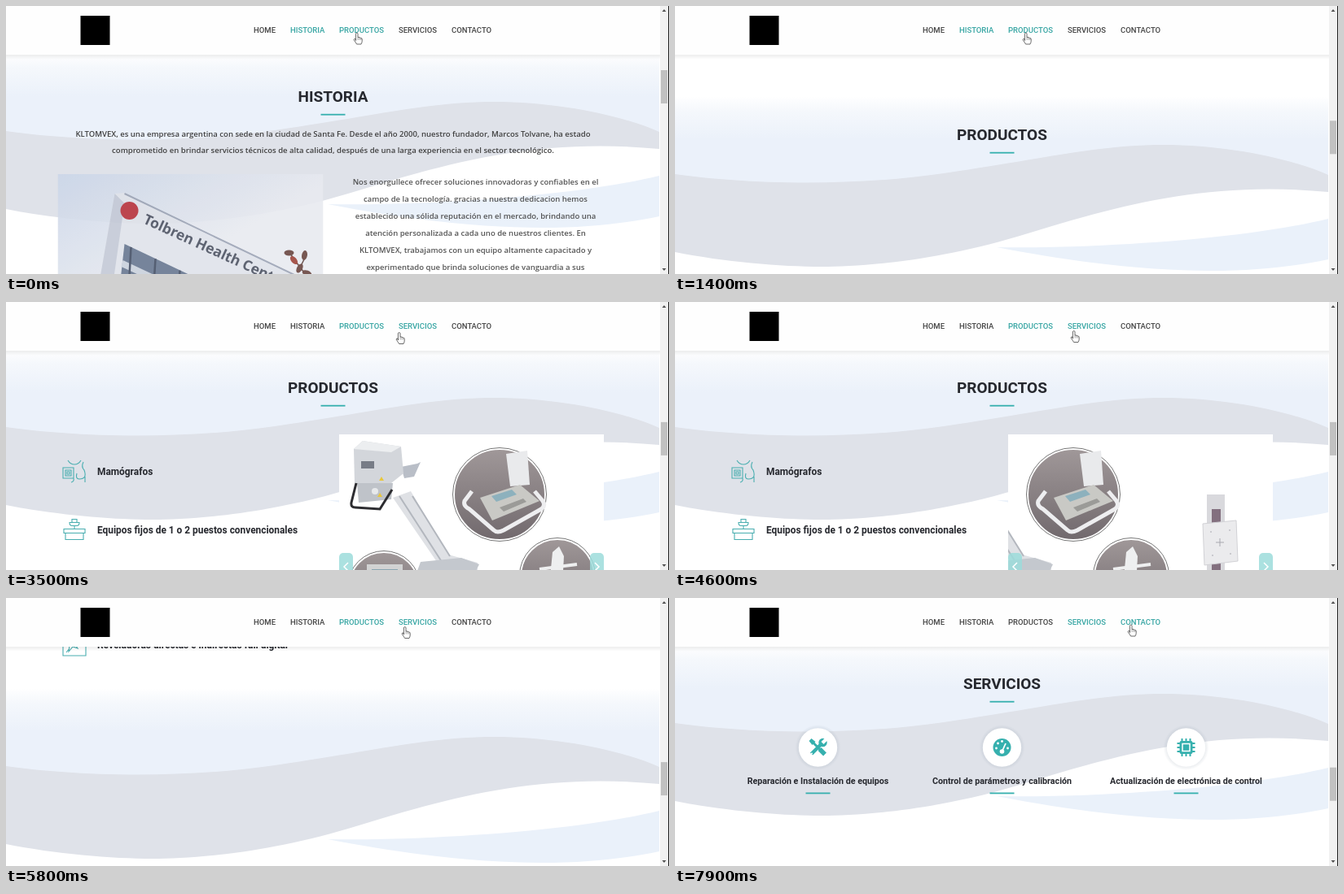
An HTML page for the animation above (8000 ms loop, 814 by 330 pixels).

```html
<!DOCTYPE html>
<html lang="es">
<head>
<meta charset="utf-8">
<title>Historia, productos y servicios</title>
<style>
html, body { margin: 0; width: 100%; height: 100%; overflow: hidden; background: #fff; }
svg { display: block; width: 100vw; height: 100vh; }
text { font-family: Roboto, sans-serif; fill: #26282e; }
.nav { font-size: 9.5px; font-weight: 500; fill: #444; }
.nav.on { fill: #36a5a3; }
.h { font-size: 19px; font-weight: 700; }
.p { font: 600 9.54px "Open Sans", sans-serif; fill: #404040; }
.item { font-size: 11.9px; font-weight: 700; }
.svc { font-size: 10.7px; font-weight: 700; }
.mid { text-anchor: middle; }
.sign { font: 700 17.5px "Open Sans", sans-serif; fill: #4a5060; }
.ico { fill: none; stroke: #49aeb0; stroke-width: 1.1; }
</style>
</head>
<body>
<svg id="stage" viewBox="0 0 814 330" preserveAspectRatio="none"></svg>
<script>
const TEAL = '#36b0ae', LOOP = 8000, STEP = 100, CX = 401.5;
const HEAD = { historia: 112, productos: 661, servicios: 1151 };

const text = (x, y, s, cls) => `<text x="${x}" y="${y}" class="${cls}">${s}</text>`;
const rect = (x, y, w, h, fill, more = '') =>
  `<rect x="${x}" y="${y}" width="${w}" height="${h}" fill="${fill}" ${more}/>`;
const path = (d, fill, more = '') => `<path d="${d}" fill="${fill}" ${more}/>`;
const line = (d, stroke, w, more = '') => path(d, 'none', `stroke="${stroke}" stroke-width="${w}" ${more}`);
const disc = (x, y, r, fill, more = '') => `<circle cx="${x}" cy="${y}" r="${r}" fill="${fill}" ${more}/>`;
const group = (id, body, more = '') => `<g id="${id}" ${more}>${body}</g>`;
const at = (x, y, body) => `<g transform="translate(${x} ${y})">${body}</g>`;
const rule = (x, y) => rect(x - 15, y, 30, 1.8, TEAL);

// Every section is placed by the middle of its heading.
const waves =
  path('M0-48H802V60L0 100Z', 'url(#haze)') +
  path('M395 138C520 140 700 128 802 103V153C720 170 600 178 395 138Z', '#eaf1fa') +
  path('M0 48C70 58 200 66 330 47S520 12 600 12S760 30 802 49V70C640 54 520 95 420 125S230 162 180 162S60 156 0 144Z', '#dfe2e9');
const section = (name, lift, body) => at(0, HEAD[name], at(0, -lift, waves) +
  group('h-' + name, text(CX, 6.4, name.toUpperCase(), 'h mid') + rule(CX, 20.8)) + body);

const photo = `<svg x="69" y="95" width="326" height="300">` +
  rect(0, 0, 326, 300, 'url(#sky)') +
  path('M70 24L82 23L326 140V300H22Z', '#dfe2ea') +
  path('M70 24L22 300H44L82 36Z', '#c3c9d6') +
  path('M82 86L326 202V300H58Z', '#66768f') +
  path('M80 106L326 222V230L78 114Z', '#c9d0dc') +
  [90, 120, 150, 180, 210, 240, 270].map(x => line(`M${x} ${x * .477 + 47}L${x - 12} 300`, '#414c62', 2.5)).join('') +
  line('M82 24L326 141', '#9aa2b4', 2) +
  disc(88, 45, 11, '#b8323c') +
  `<g transform="translate(104 60) rotate(24.6)">${text(0, 0, 'Tolbren Health Center', 'sign')}</g>` +
  line('M326 150Q302 122 284 96M306 126L290 130M298 114L306 98', '#5c403c', 1.5) +
  [[284, 97], [290, 106], [303, 100], [288, 128], [306, 122], [315, 134], [297, 116]]
    .map(([x, y], i) => `<ellipse cx="${x}" cy="${y}" rx="6" ry="3.4" transform="rotate(${i * 50} ${x} ${y})" fill="${i % 2 ? '#9c4238' : '#67433d'}"/>`).join('') +
  '</svg>';

const intro = [
  'KLTOMVEX, es una empresa argentina con sede en la ciudad de Santa Fe. Desde el año 2000, nuestro fundador, Marcos Tolvane, ha estado',
  'comprometido en brindar servicios técnicos de alta calidad, después de una larga experiencia en el sector tecnológico.'];
const about = [
  'Nos enorgullece ofrecer soluciones innovadoras y confiables en el',
  'campo de la tecnología. gracias a nuestra dedicacion hemos',
  'establecido una sólida reputación en el mercado, brindando una',
  'atención personalizada a cada uno de nuestros clientes. En',
  'KLTOMVEX, trabajamos con un equipo altamente capacitado y',
  'experimentado que brinda soluciones de vanguardia a sus',
  'clientes en todo el país.'];
const para = (lines, x, y) => lines.map((s, i) => text(x, y + i * 20.9, s, 'p mid')).join('');

// Icons are drawn around the middle of their line of text.
const icons = [
  'M-14-5H-1V8H-14ZM-11-2H-4V5H-11ZM-9 0H-6V3H-9ZM-8-14Q-5-9 0-9T8-14M11-12Q8-6 12-2Q16 9 6 9Q1 9 3 2M-1 8Q0 12-4 13M13 6V13',
  'M-13-1H13V4H-13ZM-11 4V12H11V4M-6-9H6Q6-5 3-5H-3Q-6-5-6-9ZM-3-9V-13H3V-9M0-5V-1',
  'M-12-12H2V2H-12ZM-5 2V10M-10 12H12M2-5H10V10M-8-8H-2V-2H-8Z',
  'M10-12A13 13 0 1 0 10 12M6-14H13V-7H6ZM5 8H13V14H5ZM-3 13V16',
  'M-14-14H14V13H-14ZM-10 9L-6 4M-7 8L-2 2L4 4L0-2L6-8L3-10L-4-4L-9-4L-6 0Z'];
const products = ['Mamógrafos', 'Equipos fijos de 1 o 2 puestos convencionales', 'Equipos rodantes',
  'Arcos en C', 'Reveladoras directas e indirectas full digital'];
const items = products.map((s, i) => group('item' + i,
  at(84, 103 + i * 71.5, `<path class="ico" d="${icons[i]}"/>` + text(28, 4.3, s, 'item')))).join('');

const lens = (x, y, r) => disc(x, y, r, 'url(#lens)', 'stroke="#fff" stroke-width="2"') +
  disc(x, y, r + 1.5, 'none', 'stroke="#777" stroke-width="1"');
const slideA = rect(0, 0, 325, 325, '#fff') +
  path('M66 78L88 70L134 148L170 158V240H108L122 160Z', '#dfe1e5') +
  line('M74 76L128 160M90 76L136 150', '#b3b7be', 2) +
  path('M76 40L96 36L100 34L92 52L80 54Z', '#b9bec7') +
  path('M18 18L29 8L76 15L79 48L64 60L19 60Z', '#d3d6db') +
  path('M18 18L29 8L76 15L64 22Z', '#eceef0') +
  rect(27, 33, 16, 9, '#777c86') +
  path('M22 60H66L64 80L24 84Z', '#bfc3c9') + disc(44, 70, 4, '#e7e9eb') +
  path('M52 52l3 5h-6zM50 72l3 5h-6z', '#e8c73c') +
  line('M21 60L15 84Q14 90 20 90L50 92L65 68', '#2d2d31', 3) +
  path('M100 157L150 152L172 160L168 168H96Z', '#c4c8ce') +
  lens(197, 74, 56) +
  path('M205 24L231 20L234 62L210 64Z', '#e9eaec') +
  path('M173 78L222 62L246 82L188 106Z', '#c9c9c5') +
  path('M187 76L212 68L218 74L193 83Z', '#8db1bd') +
  path('M197 90L226 79L230 83L202 95Z', '#9b9b98') +
  line('M163 70L154 82Q152 88 160 92L190 118Q194 122 202 118L248 92Q254 88 250 82L240 70', '#eeeef0', 5) +
  lens(55, 188, 43) + rect(34, 160, 44, 40, '#d2d3d3') + rect(40, 166, 32, 14, '#89a5b1') +
  lens(268, 174, 45) + path('M262 145L270 138L276 150L274 186H258Z', '#eeeff0') +
  line('M246 166L292 160M252 176H290', '#eeeff0', 4);

const column = (x, y) => rect(x, y, 22, 325 - y, '#d9d9dd') + rect(x + 6, y + 18, 11, 307 - y, '#83707f');
const slideB = rect(0, 0, 325, 325, '#fff') +
  column(36, 74) + path('M31 110L72 106L74 156L33 161Z', '#ebebed', 'stroke="#d2d2d6"') +
  line('M52 128V138M47 133H57M40 120h2M63 118h2M42 149h2M64 147h2', '#a9a9b0', 1) +
  column(169, 56) +
  path('M127 92Q125 88 131 88L194 86Q199 88 199 98T194 109L134 111Q127 110 127 92Z', '#e6e6e8') +
  path('M146 88H166V111H148Z', '#cfd0d3') + line('M130 108L196 106', '#b8b8bd', 2) +
  path('M138 112L170 110L172 130L142 134Z', '#737378') + disc(156, 122, 4, '#c7c7cb') +
  line('M133 112L130 134Q130 140 136 140L164 142Q168 142 168 136', '#37373b', 3) +
  disc(252, 92, 36, '#cfcfd1', 'stroke="#8b8b8f"') +
  rect(219, 71, 69, 49, '#c0beb9', 'stroke="#a5a39f"') +
  rect(241, 82, 22, 9, '#64b9ee') +
  line('M226 102H282M230 110H278', '#86868a', 2, 'stroke-dasharray="3 4"') + disc(252, 103, 4, '#8c8c90');

const arrow = (x, dir) => rect(x, 146, 17, 34, '#9cdcda', 'rx="5" opacity=".85"') +
  line(`M${x + 8.5 - 2.5 * dir} 158l${5 * dir} 5l${-5 * dir} 5`, '#fff', 1.5);
const carousel = group('carousel', `<svg x="409" y="57" width="325" height="325">` +
  group('slideA', slideA) + group('slideB', slideB) + arrow(0, -1) + arrow(308, 1) + '</svg>');

const tools = line('M-7-7L8 8', TEAL, 3) + line('M2 2L8.5 8.5', TEAL, 5.5) + path('M-11-8L-8-11L-3-7L-7-3Z', TEAL) +
  line('M-8 8L5-5', TEAL, 4.5) + disc(6, -6, 5.2, TEAL) + path('M4-7L10-13L13-10L7-4Z', '#fff') + disc(-7.5, 7.5, 1, '#fff');
const gauge = disc(0, 0, 11, TEAL) + [[-7, 1], [-5, -5], [0, -7.5], [7, 1]].map(([x, y]) => disc(x, y, 1.4, '#fff')).join('') +
  line('M0 5L4.5-5', '#fff', 1.8) + disc(0, 5, 2.8, '#fff');
const chip = [-5, 0, 5].map(v => line(`M${v}-11V11M-11 ${v}H11`, TEAL, 2)).join('') +
  rect(-8, -8, 16, 16, TEAL, 'rx="2"') + rect(-4.5, -4.5, 9, 9, TEAL, 'stroke="#fff" stroke-width="1.5"');
const services = [['Reparación e Instalación de equipos', tools], ['Control de parámetros y calibración', gauge],
  ['Actualización de electrónica de control', chip]].map(([s, icon], i) => group('svc' + i, at(175.5 + i * 226, 78,
    disc(0, 0, 28, 'url(#glow)') + disc(0, 0, 23.7, '#fff') + icon + text(0, 45, s, 'svc mid') + rule(0, 55.5)))).join('');

const menu = [['HOME', 304], ['HISTORIA', 349], ['PRODUCTOS', 409], ['SERVICIOS', 482], ['CONTACTO', 547]];
const header = rect(0, 60, 803, 6, 'url(#shade)') + rect(0, 0, 803, 60, '#fefefe') + rect(91.5, 12, 36, 36, '#000') +
  menu.map(([s, x]) => text(x, 32.7, s, 'nav')).join('');
const scrollbar = rect(803, 0, 10, 330, '#f1f1f1') + rect(813, 0, 1, 330, '#222') +
  path('M805.5 7h5l-2.5-3zM805.5 323h5l-2.5 3z', '#505050') + rect(804, 79, 8, 41, '#c1c1c1', 'id="thumb"');
const hand = group('hand', path('M-2.6 2.5V-5.6a1.3 1.3 0 0 1 2.6 0V-1.4Q1.3-2.2 2-1Q3.2-1.6 3.8-.4Q5.2-.6 5.2 1V3.4Q5 5.4 4 7H-1.4Q-2.4 5.2-4.9 1.6Q-4.6-.6-2.6 1Z',
  '#fff', 'stroke="#444" stroke-width=".8" stroke-linejoin="round"') + line('M0-1.4V2M2-1V2M3.8-.4V2', '#555', .5));

const grad = (id, stops, dir = 'x2="0" y2="1"') => `<linearGradient id="${id}" ${dir}>` +
  stops.map(([o, c, a = 1]) => `<stop offset="${o}" stop-color="${c}" stop-opacity="${a}"/>`).join('') + '</linearGradient>';

document.getElementById('stage').innerHTML = '<defs>' +
  grad('haze', [[0, '#fff'], [.12, '#f5f8fc'], [.36, '#ebf1fa'], [1, '#ebf1fa']]) +
  grad('sky', [[0, '#cbd6e8'], [.6, '#e8eaf0']], 'x2=".5" y2=".8"') +
  grad('lens', [[0, '#a09899'], [1, '#71696d']]) +
  grad('shade', [[0, '#000', .07], [1, '#000', 0]]) +
  '<radialGradient id="glow"><stop offset=".8" stop-color="#8090a0" stop-opacity=".2"/><stop offset="1" stop-color="#8090a0" stop-opacity="0"/></radialGradient></defs>' +
  group('page',
    section('historia', 6, para(intro, CX, 48.5) + group('photo', photo) + group('about', para(about, 571, 108))) +
    section('productos', 0, items + carousel) +
    section('servicios', 0, services)) +
  header + scrollbar + hand;

const el = id => document.getElementById(id);
const links = [...document.querySelectorAll('.nav')];
const put = (id, x, y, a = 1) => {
  el(id).setAttribute('transform', `translate(${x} ${y})`);
  el(id).setAttribute('opacity', a);
};
// Straight interpolation over [time, value] pairs.
const track = (t, keys) => {
  const i = keys.findIndex(k => k[0] > t);
  if (i < 0) return keys[keys.length - 1][1];
  if (!i) return keys[0][1];
  const [t0, a] = keys[i - 1], [t1, b] = keys[i];
  return a + (b - a) * (t - t0) / (t1 - t0);
};
const enter = (t, start, span) => {
  const p = Math.min(1, Math.max(0, (t - start) / span));
  return p * (2 - p);
};

const scroll = [[800, 0], [900, 7], [1000, 20], [1100, 59], [1200, 171], [1300, 400], [1400, 502], [1500, 502],
  [1600, 537], [1700, 549], [1900, 554], [2100, 555], [5300, 555], [5400, 559.5], [5500, 573], [5600, 627],
  [5700, 830], [5800, 992], [5900, 1031], [6000, 1042], [6200, 1045]];
const handX = [[2900, 432], [3100, 452], [3300, 478], [3500, 484], [4000, 491], [7200, 491], [7600, 561]];
const handY = [[2900, 40], [3500, 44.5], [4000, 42.5], [7200, 42.5], [7600, 40]];
const settle = [[0, 5.5], [100, 3.2], [200, 1.5], [400, 0]];
const slide = [[4400, 0], [4500, .1], [4600, .36], [4700, .66], [4800, .86], [4900, .96], [5000, 1]];

function draw(t) {
  const s = track(t, scroll), x = track(t, handX);
  put('page', 0, -s);
  put('hand', x, track(t, handY));
  el('thumb').setAttribute('y', 79 + s * .1241);

  const active = t < 1600 ? 1 : t < 5900 ? 2 : 3;
  const hover = x < 466 ? 2 : x < 476 ? -1 : x < 532 ? 3 : x < 546 ? -1 : 4;
  links.forEach((n, i) => n.classList.toggle('on', i === active || i === hover));

  const d = track(t, settle), a = 1 - d * .02;
  put('photo', -d, 0, a);
  put('about', d, 0, a);

  products.forEach((_, i) => {
    const p = enter(t, i ? 3200 : 2800, 300);
    put('item' + i, -59 * (1 - p), 0, p);
  });
  const c = enter(t, 2800, 300);
  put('carousel', 59 * (1 - c), 0, c);
  const k = track(t, slide);
  put('slideA', -325 * k, 0);
  put('slideB', 325 * (1 - k), 0);

  put('h-servicios', 0, 0, enter(t, 5800, 400));
  for (let i = 0; i < 3; i++) {
    const p = enter(t, 6200 + i * 350, 600);
    put('svc' + i, 0, 7 * (1 - p), p);
  }
}

// The picture advances ten times per second.
const begin = performance.now();
function tick() {
  const t = (performance.now() - begin) % LOOP;
  draw(Math.floor(t / STEP) * STEP);
  requestAnimationFrame(tick);
}
tick();
</script>
</body>
</html>
```
